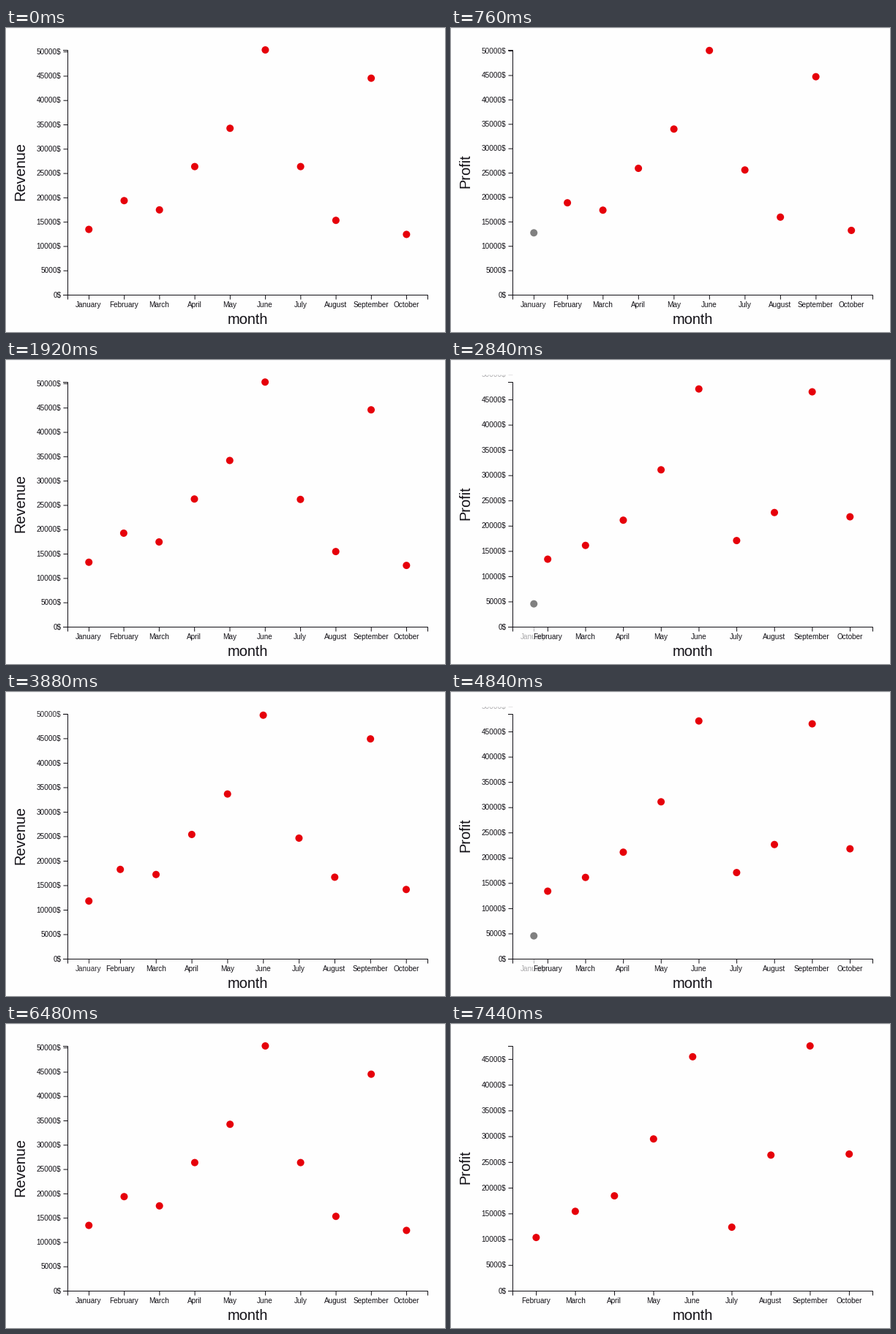
Animation, 600 px wide and 416 px high, one loop 7.72 s. Source, as a matplotlib script:

```python
import matplotlib.pyplot as plt
from matplotlib.animation import FuncAnimation
from matplotlib.patches import Circle, Rectangle

W, H, DPI = 600, 416, 100
PX = 72 / DPI
STEP_MS, FRAMES = 40, 193
LEFT, TOP, WIDTH, HEIGHT = 84.3, 30, 492, 335
BOTTOM = TOP + HEIGHT
AXIS_X, AXIS_Y = 84.5, BOTTOM + 0.5
PAD = 0.2
BG, INK, RED, GREY = "#fefefe", "#121016", "#e6000a", "#808080"

# The metric switches every second; each switch eases over a quarter second.
TO_PROFIT, TO_REVENUE, CYCLE, EASE_MS = 701, 1707, 2000, 250

MONTHS = ["January", "February", "March", "April", "May",
          "June", "July", "August", "September", "October"]
REVENUE = [13432, 19342, 17443, 26342, 34213, 50321, 26342, 15290, 44510, 12400]
PROFIT = [0, 10342, 15423, 18432, 29480, 45440, 12342, 26342, 47542, 26542]

plt.rcParams["font.family"] = "Liberation Sans"
fig = plt.figure(figsize=(W / DPI, H / DPI), dpi=DPI, facecolor=BG)
ax = fig.add_axes([0, 0, 1, 1])
ax.set_xlim(0, W)
ax.set_ylim(H, 0)
ax.axis("off")


def lerp(a, b, p):
    return a + (b - a) * p


def ease(t):
    t = min(max(t, 0), 1)
    return 4 * t ** 3 if t < 0.5 else 1 - 4 * (1 - t) ** 3


def band(i, n):
    step = WIDTH / (n + PAD)
    return LEFT + step * (i + (1 + PAD) / 2)


def y_pos(value, top):
    return BOTTOM - HEIGHT * value / top


def line(xs, ys):
    return ax.plot(xs, ys, color=INK, lw=PX, snap=False,
                   solid_capstyle="butt", solid_joinstyle="miter")[0]


def label(x, y, s, size, ha="center", **kw):
    return ax.text(x, y, s, size=size * PX, ha=ha, va="baseline", color=INK, **kw)


class XTick:
    def __init__(self, i, name):
        self.fixed = i == 0
        self.x0 = band(i, 10)
        self.x1 = self.x0 if self.fixed else band(i - 1, 9)
        self.y0 = y_pos(REVENUE[i], max(REVENUE))
        self.y1 = y_pos(PROFIT[i], max(PROFIT))
        self.tick = line([0, 0], [AXIS_Y, AXIS_Y + 6])
        self.text = label(0, BOTTOM + 16.5, name, 10)
        self.dot = ax.add_patch(Circle((0, 0), 5, fc=RED, lw=0, zorder=4))

    def update(self, p, profit):
        x = lerp(self.x0, self.x1, p)
        self.tick.set_xdata([x + 0.2] * 2)
        self.text.set_x(x - 0.3)
        self.dot.center = x, lerp(self.y0, self.y1, p)
        if self.fixed:
            self.tick.set_alpha(1 - p)
            self.text.set_alpha(1 - p)
            self.dot.set_visible(p < 1)
            self.dot.set_facecolor(GREY if profit else RED)


class YTick:
    def __init__(self, value):
        self.fades = value > max(PROFIT)
        self.y0 = y_pos(value, max(REVENUE))
        self.y1 = y_pos(value, max(PROFIT))
        self.tick = line([AXIS_X - 6, AXIS_X], [0, 0])
        self.text = label(LEFT - 9, 0, f"{value}$", 10, ha="right")

    def update(self, p):
        y = lerp(self.y0, self.y1, p) + 0.5
        self.tick.set_ydata([y, y])
        self.text.set_y(y + 3.2)
        if self.fades:
            self.tick.set_alpha(1 - p)
            self.text.set_alpha(1 - p)


line([AXIS_X - 6.5, AXIS_X, AXIS_X, AXIS_X - 6.5],
     [TOP + 0.5, TOP + 0.5, AXIS_Y, AXIS_Y])
line([AXIS_X, AXIS_X, AXIS_X + WIDTH, AXIS_X + WIDTH],
     [AXIS_Y + 6, AXIS_Y, AXIS_Y, AXIS_Y + 6])
label(330, 405, "month", 20)
title = label(25, 196, "", 20, rotation=90, rotation_mode="anchor")

x_ticks = [XTick(i, m) for i, m in enumerate(MONTHS)]
y_ticks = [YTick(v) for v in range(0, 50001, 5000)]

# The chart is cut off at its top edge.
ax.add_patch(Rectangle((0, 0), W, 20.4, fc=BG, lw=0, snap=False, zorder=6))
ax.add_patch(Rectangle((0, 0), W, 1, fc="#f4f4f6", lw=0, zorder=7))


def draw(frame):
    u = frame * STEP_MS % CYCLE
    profit = TO_PROFIT <= u < TO_REVENUE
    if profit:
        p = ease((u - TO_PROFIT) / EASE_MS)
    else:
        p = 1 - ease((u - TO_REVENUE) % CYCLE / EASE_MS)
    title.set_text("Profit" if profit else "Revenue")
    for t in x_ticks:
        t.update(p, profit)
    for t in y_ticks:
        t.update(p)
    return []


anim = FuncAnimation(fig, draw, frames=FRAMES, interval=STEP_MS,
                     repeat=True, repeat_delay=0, blit=False)
plt.show()
```
